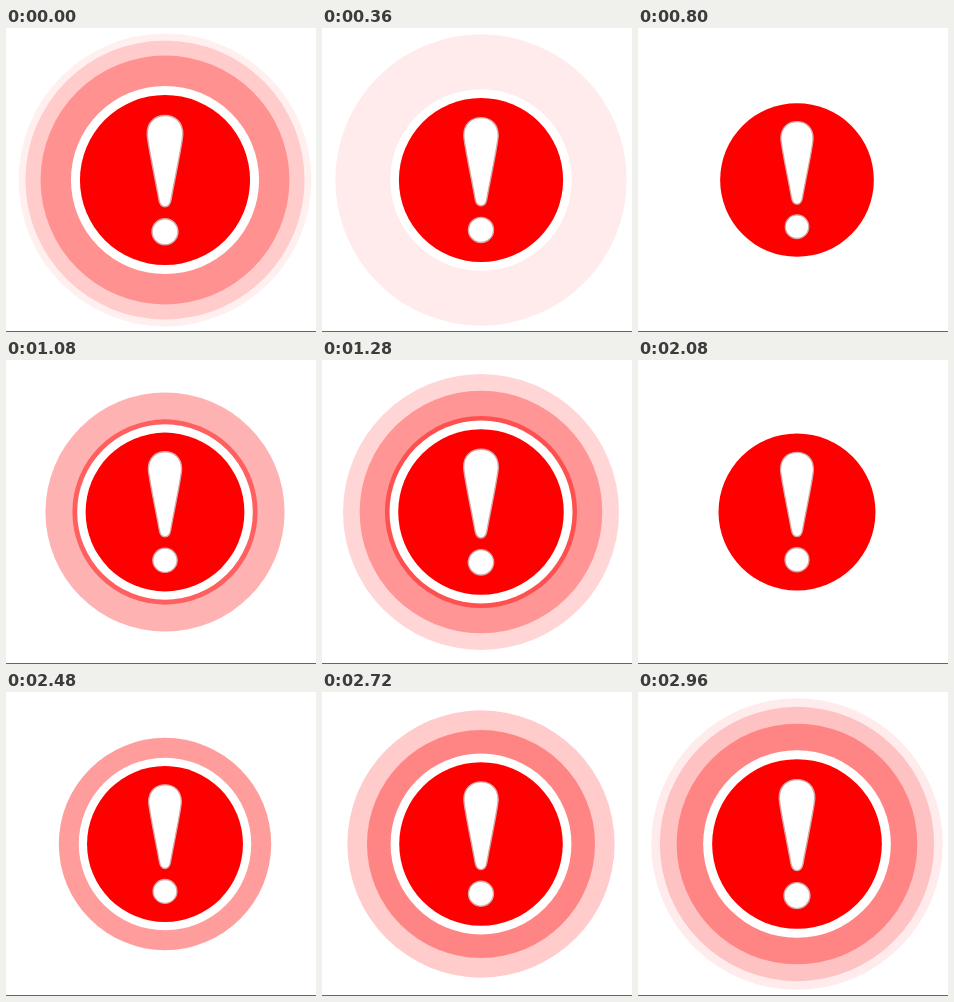
An HTML page that plays this animation: 310x304 px, repeating every 3000 ms.

```html
<!DOCTYPE html>
<html lang="en">
<head>
<meta charset="utf-8">
<title>Pulsing alert</title>
<style>
  html, body { margin: 0; width: 100%; height: 100%; overflow: hidden; background: #fff; }
  svg { display: block; width: 310px; height: 304px; }
</style>
</head>
<body>
<svg viewBox="0 0 310 304">
  <rect width="310" height="304" fill="#fff"/>
  <g id="waves" transform="translate(159 152)" fill="#f00"></g>
  <g id="badge">
    <circle r="94" fill="#fff"/>
    <circle r="85" fill="#f00"/>
    <g fill="#fff" stroke="#d8a5a5" stroke-width="1.4">
      <path d="M-17.8 -46C-17.8 -58 -10 -64.5 0 -64.5S17.8 -58 17.8 -46C17.8 -38 8.5 5 6 20C5 25 3 26.7 0 26.7S-5 25 -6 20C-8.5 5 -17.8 -38 -17.8 -46Z"/>
      <circle cy="51.7" r="13"/>
    </g>
  </g>
  <rect y="303" width="310" height="1" fill="#666"/>
</svg>
<script>
const LOOP = 3000, BEAT = 1500, STEP = 40;
const WAVE_START = 850, WAVE_GAP = 200, WAVE_TIME = 720, MAX_RADIUS = 147;
const SVG_NS = "http://www.w3.org/2000/svg";
const badge = document.getElementById("badge");
const waves = [0, 1, 2].map(() =>
  document.getElementById("waves").appendChild(document.createElementNS(SVG_NS, "circle")));

function draw(time) {
  const t = Math.floor((time % LOOP) / STEP) * STEP;
  const scale = (81 + 4.15 * Math.cos(2 * Math.PI * (t - 50) / BEAT)) / 85;
  badge.setAttribute("transform", `translate(159 152) scale(${scale})`);

  const inner = 94 * scale;
  waves.forEach((wave, i) => {
    const age = (t - WAVE_START - i * WAVE_GAP + 2 * BEAT) % BEAT;
    const left = Math.max(0, 1 - age / WAVE_TIME);
    const alpha = Math.min(0.05 + 0.45 * left ** 1.5, 0.7 * left);
    wave.setAttribute("r", MAX_RADIUS - (MAX_RADIUS - inner) * left * left);
    wave.setAttribute("fill-opacity", alpha);
  });
}

const start = performance.now();
function tick() {
  draw(performance.now() - start);
  requestAnimationFrame(tick);
}
tick();
</script>
</body>
</html>
```
